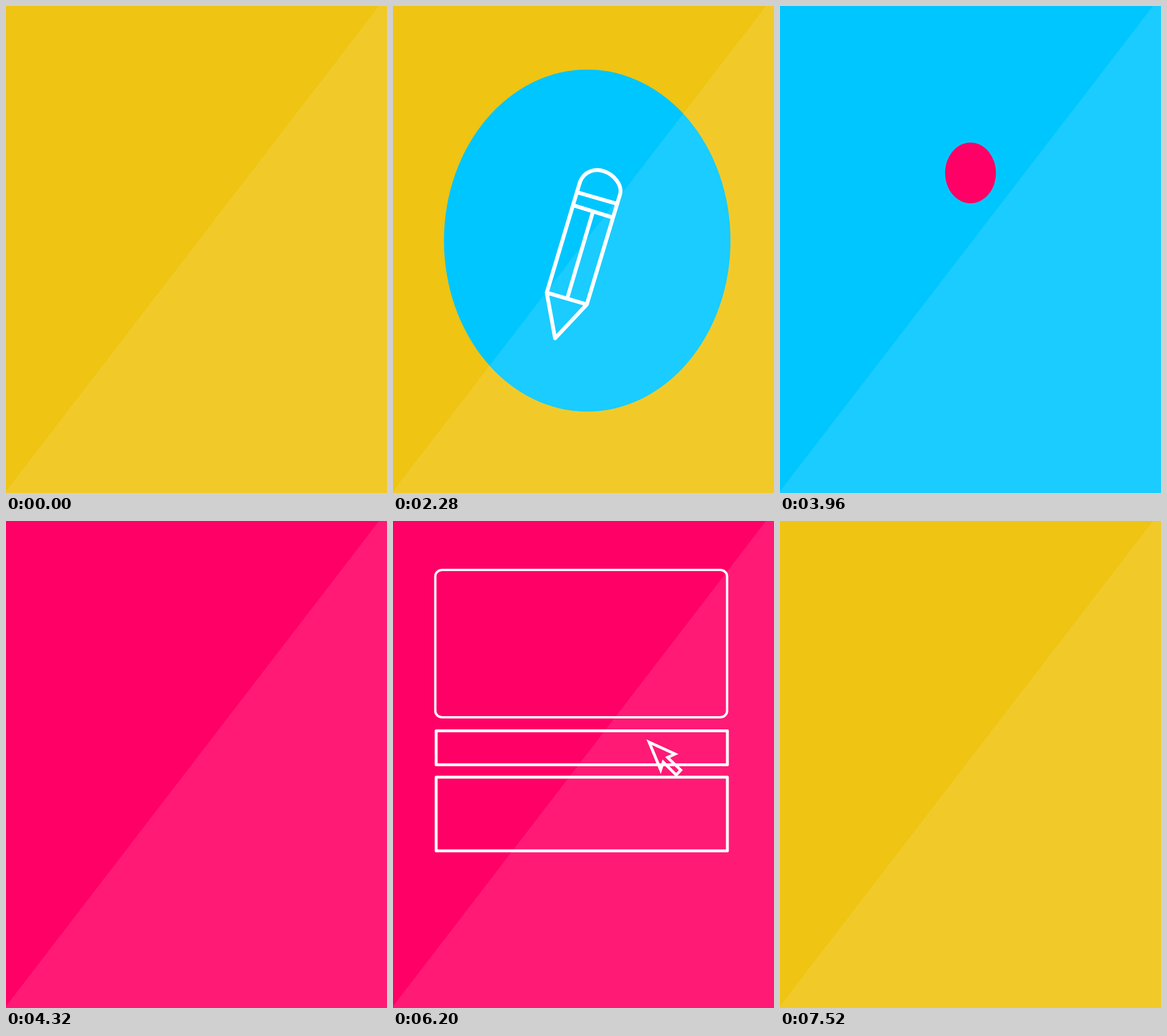
These frames come from a looping animation (662x846 px, 7800 ms). An HTML page:

```html
<!DOCTYPE html>
<html lang="en">
<head>
<meta charset="utf-8">
<title>From idea to click</title>
<style>
  html, body { margin: 0; height: 100%; overflow: hidden; background: #efc412; }
  svg { display: block; width: 662px; height: 846px; }
  .ink { fill: none; stroke: #fff; stroke-linecap: round; stroke-linejoin: round; }
</style>
</head>
<body>
<svg viewBox="0 0 662 846">
  <rect width="662" height="846" fill="#efc412"/>

  <g id="bulb" class="ink" stroke-width="6">
    <path pathLength="1" d="M298 530C298 490 232 482 232 409A100 100 0 0 1 432 409C432 482 366 490 366 530Z"/>
    <path pathLength="1" d="M300 550H364"/>
    <path pathLength="1" d="M314 572H350"/>
  </g>
  <g id="glow" class="ink" stroke-width="13"></g>

  <ellipse id="blue" cx="337.5" cy="407.5" fill="#00c6ff"/>
  <g id="sketch" class="ink">
    <path id="line" stroke-width="4" stroke-linecap="butt"/>
    <path id="pencil" stroke-width="5.6" d="M278 487L326 327C332 311 348 307 360 311C376 316 388 332 384 345L336 504ZL290 553L336 504M323 342L380 358.500M318 361L373 378M344.500 371L308 494"/>
  </g>

  <ellipse id="pink" cx="331" cy="290" fill="#ff0066"/>
  <g id="card" class="ink" stroke-width="4">
    <path pathLength="1" d="M568.500 341H85.500A12 11 0 0 1 73.500 330V96A12 11 0 0 1 85.500 85H568.500A12 11 0 0 1 580.500 96V330A12 11 0 0 1 568.500 341Z"/>
  </g>
  <g id="bars" class="ink" stroke-width="5">
    <path pathLength="1" d="M581 423.500H75V364.500H581Z"/>
    <path pathLength="1" d="M581 573H75V445H581Z"/>
  </g>
  <g id="click">
    <g id="burst" class="ink" stroke-width="9"></g>
    <path id="cursor" fill="none" stroke="#fff" stroke-width="5" d="M294 245L339 265.500L326 271.500L349 293.500L341 302L318.500 279.500L314 293Z"/>
  </g>

  <ellipse id="yellow" cx="331" cy="407" fill="#efc412"/>
  <path fill="#fff" fill-opacity=".1" d="M648 0H662V846H0V843Z"/>
</svg>
<script>
const LOOP = 7800, STEP = 40;
const $ = id => document.getElementById(id);
const span = (t, start, length) => Math.min(1, Math.max(0, (t - start) / length));
const easeOut = (u, power) => 1 - (1 - u) ** power;

// Rays sit on a ring, 30 degrees apart, clockwise.
function addRays(group, count, first, cx, cy, inner, outer) {
  for (let i = 0; i < count; i++) {
    const a = (first + 30 * i) * Math.PI / 180;
    const at = r => `${cx + r * Math.cos(a)} ${cy + r * Math.sin(a)}`;
    const ray = document.createElementNS('http://www.w3.org/2000/svg', 'path');
    ray.setAttribute('d', `M${at(inner)}L${at(outer)}`);
    ray.setAttribute('pathLength', 1);
    group.append(ray);
  }
}

function trace(path, u) {
  path.style.visibility = u > 0 ? 'visible' : 'hidden';
  path.style.strokeDasharray = u < 1 ? `${u} 2` : 'none';
}

function traceRays(group, t, start, each) {
  [...group.children].forEach((ray, i) => trace(ray, span(t, start + i * each, each)));
}

function scale(el, s, x, y) {
  el.style.display = s > 0 ? '' : 'none';
  el.setAttribute('transform', `translate(${x} ${y}) scale(${s}) translate(${-x} ${-y})`);
}

function iris(el, t, start, length, size) {
  const r = size * span(t, start, length) ** 1.85;
  el.setAttribute('rx', r * 0.838);
  el.setAttribute('ry', r);
}

function draw(t) {
  const [glass, thread, foot] = $('bulb').children;
  trace(glass, span(t, 0, 560));
  trace(thread, span(t, 560, 120));
  trace(foot, span(t, 680, 120));
  traceRays($('glow'), t, 1240, 76);
  iris($('blue'), t, 2040, 360, 629);

  const pop = t < 2280 ? 1.2 * span(t, 2080, 200) : 1.2 - 0.2 * span(t, 2280, 120);
  const dx = 166.5 * easeOut(span(t, 2600, 800), 4);
  $('pencil').setAttribute('transform', `translate(${dx})`);
  $('line').setAttribute('d', dx ? `M290 555.500L${291.5 + dx} ${555.5 + dx / 83}` : '');
  const leave = 1 - span(t, 3400, 460) ** 2;
  scale($('sketch'), pop * leave, 332 + dx, 432);
  iris($('pink'), t, 3840, 480, 685);

  const [title, body] = $('bars').children;
  trace($('card').firstElementChild, span(t, 4400, 320));
  trace(title, easeOut(span(t, 4700, 300), 2));
  trace(body, easeOut(span(t, 4990, 530), 2));
  scale($('card'), 1 - span(t, 6800, 400) ** 2, 327, 213);
  scale($('bars'), 1 - span(t, 6838, 400) ** 2, 345, 490);

  const away = 1 - easeOut(span(t, 6120, 400), 3);
  $('cursor').setAttribute('transform', `translate(${295 * away} ${272 * away})`);
  traceRays($('burst'), t, 6520, 40);
  scale($('click'), t < 6160 ? 0 : 1 - span(t, 6960, 340) ** 2, 309, 271.5);
  iris($('yellow'), t, 7060, 460, 640);
}

function tick() {
  draw(Math.floor(performance.now() % LOOP / STEP) * STEP);
  requestAnimationFrame(tick);
}

addRays($('glow'), 10, 135, 328.5, 406, 150, 177);
addRays($('burst'), 12, 195, 309, 271.5, 76, 89);
tick();
</script>
</body>
</html>
```
